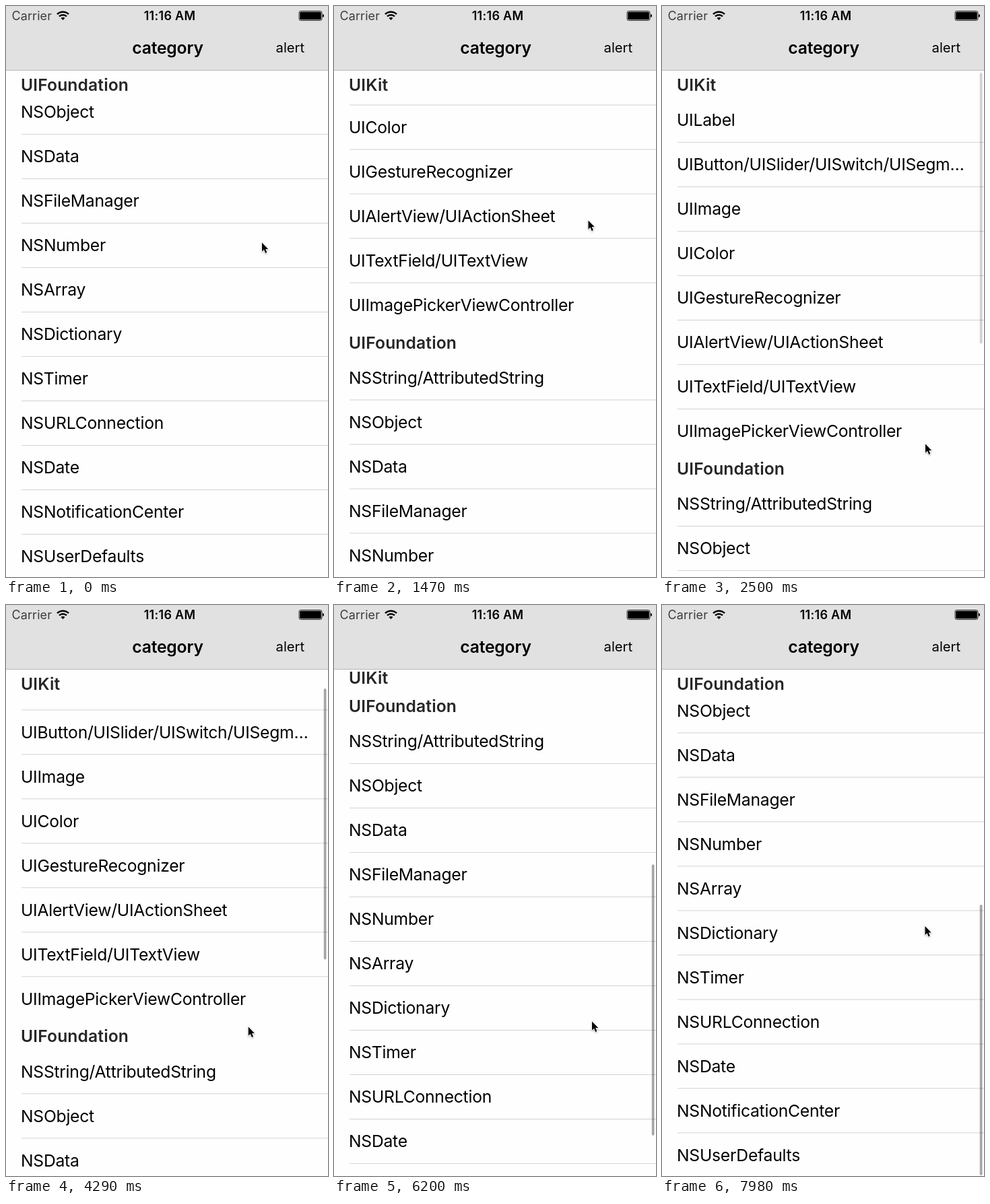
Write an HTML page that moves like this. It is 478x848 px and loops after 8000 ms.

```html
<!DOCTYPE html>
<html lang="en">
<head>
<meta charset="utf-8">
<title>category</title>
<style>
  html, body { margin: 0; width: 100%; height: 100%; overflow: hidden; background: #fefefe; }
  svg { display: block; width: 478px; height: 848px; font-family: Inter, Roboto, sans-serif; }
  .row { font-size: 24.7px; letter-spacing: -.26px; }
  .head { font-size: 24.7px; font-weight: 600; letter-spacing: .1px; fill: #262628; }
  .title { font-size: 24.7px; font-weight: 600; letter-spacing: -.2px; text-anchor: middle; }
  .button { font-size: 20.3px; }
  .status { font-size: 18px; letter-spacing: .1px; }
  .clock { font-weight: 600; letter-spacing: .3px; text-anchor: middle; }
  .line { fill: #d3d3d6; }
</style>
</head>
<body>
<svg viewBox="0 0 478 848">
  <rect width="478" height="848" fill="#fefefe"/>
  <g id="list"></g>
  <g id="heads"></g>
  <rect id="bar" x="471.75" width="3.75" rx="1.9"/>
  <rect width="478" height="95" fill="#e1e1e1"/>
  <rect y="95" width="478" height="1" fill="#b8b8b8"/>
  <text class="status" x="8.5" y="21" fill="#3c3c3c">Carrier</text>
  <g fill="none" stroke="#000" stroke-width="2.5">
    <path d="M76 12.2a12 12 0 0 1 17 0M79 15.4a7.8 7.8 0 0 1 11 0"/>
    <path d="M84.5 21l-3-3a4.2 4.2 0 0 1 6 0z" fill="#000" stroke="none"/>
  </g>
  <text class="status clock" x="243" y="21">11:16 AM</text>
  <rect x="435" y="7.5" width="34" height="14" rx="2.5" fill="none" stroke="#000" stroke-width=".8"/>
  <rect x="436.2" y="8.700" width="31.600" height="11.600" rx="1.4"/>
  <path d="M470 12q2 .4 2 2.500t-2 2.500z"/>
  <text class="title" x="240" y="71">category</text>
  <text class="button" x="400.5" y="69">alert</text>
  <path id="cursor" d="M0 -.5V12.500L3 9.800L5.200 15L7.300 14L5.200 9H9.200Z"
    stroke="#fff" stroke-width="1.4" paint-order="stroke"
    style="filter: drop-shadow(0 1px 1px rgba(0,0,0,.3))"/>
</svg>
<script>
const LOOP = 8000, TICK = 147.8, LAST = 54;
const TOP = 95, ROW = 66, HEAD = 42, MAX = 648;
const sections = [
  ['UIKit', 'UILabel', 'UIButton/UISlider/UISwitch/UISegm…', 'UIImage', 'UIColor',
    'UIGestureRecognizer', 'UIAlertView/UIActionSheet', 'UITextField/UITextView',
    'UIImagePickerViewController'],
  ['UIFoundation', 'NSString/AttributedString', 'NSObject', 'NSData', 'NSFileManager',
    'NSNumber', 'NSArray', 'NSDictionary', 'NSTimer', 'NSURLConnection', 'NSDate',
    'NSNotificationCenter', 'NSUserDefaults']
];

const $ = id => document.getElementById(id);
const clamp = (v, lo, hi) => Math.min(hi, Math.max(lo, v));
const move = (el, x, y) => el.setAttribute('transform', `translate(${x} ${y})`);
function add(parent, tag, attrs, text) {
  const el = document.createElementNS('http://www.w3.org/2000/svg', tag);
  for (const k in attrs) el.setAttribute(k, attrs[k]);
  if (text) el.textContent = text;
  return parent.appendChild(el);
}

let y = 0;
const heads = sections.map(([name, ...rows], s) => {
  const g = add($('heads'), 'g', {});
  add(g, 'rect', { width: 478, height: HEAD, fill: '#fefefe' });
  add(g, 'text', { class: 'head', x: 22, y: 31 }, name);
  const start = y;
  y += HEAD;
  rows.forEach((label, i) => {
    add($('list'), 'text', { class: 'row', x: 22, y: y + 41.4 }, label);
    y += ROW;
    if (s || i < rows.length - 1)
      add($('list'), 'rect', { class: 'line', x: 23, y: y - 1, width: 455, height: 1 });
  });
  return { g, start };
});

// Eases: an even drag, a smooth move, and a flick or bounce that dies away.
const even = p => p;
const smooth = p => p * p * (3 - 2 * p);
const settle = p => (1 - Math.exp(-2.36 * p)) / (1 - Math.exp(-2.36));

// Each step runs from one tick to another and then holds its end value.
const track = (from, steps) => n => steps.reduce(
  (v, [a, b, ease, to]) => v + (to - v) * ease(clamp((n - a) / (b - a), 0, 1)), from);

const scroll = track(MAX, [
  [0, 7, even, 187.5],     // drag down
  [11, 14, even, -28],     // drag past the top
  [14, 17, settle, 0],     // bounce back
  [28, 31, even, 140],     // drag up
  [33, 42, settle, 537],   // flick
  [43, 50, settle, 667],   // drag past the end
  [51, 54, settle, 648.6]  // bounce back
]);
const cursorX = track(380, [
  [0, 7, even, 391], [7, 10, smooth, 377.5], [10, 17, even, 391], [17, 24, even, 352],
  [24, 27, even, 358], [28, 34, even, 368.5], [38, 42, smooth, 383], [43, 50, settle, 390.5]
]);
const cursorY = track(352, [
  [0, 7, even, 812], [7, 10, smooth, 319], [10, 14, smooth, 590], [14, 17, settle, 651],
  [17, 24, even, 745], [28, 31, settle, 549], [33, 34, even, 507.5],
  [38, 42, smooth, 619], [43, 50, settle, 477.5]
]);

// The bar shows while the list is in use and fades over two ticks.
const touches = [[0, 7], [10, 16], [28, LAST]];
const barAlpha = n => Math.max(...touches.map(([a, b]) =>
  clamp(Math.min(n - a, 1 - (n - b) / 2), 0, 1)));

function draw(n) {
  const s = scroll(n);
  move($('list'), 0, TOP - s);
  heads.forEach(({ g, start }, i) => {
    const next = heads[i + 1];
    let pos = s < 0 ? start - s : Math.max(0, start - s);
    if (next) pos = Math.min(pos, next.start - HEAD - s);
    move(g, 0, TOP + pos);
  });

  const inside = clamp(s, 0, MAX), over = s - inside;
  const bar = $('bar');
  bar.setAttribute('y', 99 + inside * 345.5 / MAX + Math.max(0, over));
  bar.setAttribute('height', 402.5 - Math.abs(over));
  bar.setAttribute('fill-opacity', .35 * barAlpha(n));
  move($('cursor'), cursorX(n), cursorY(n));
}

function loop() {
  const t = performance.now() % LOOP;
  draw(Math.min(LAST, Math.floor((t + 14) / TICK)));
  requestAnimationFrame(loop);
}
loop();
</script>
</body>
</html>
```
